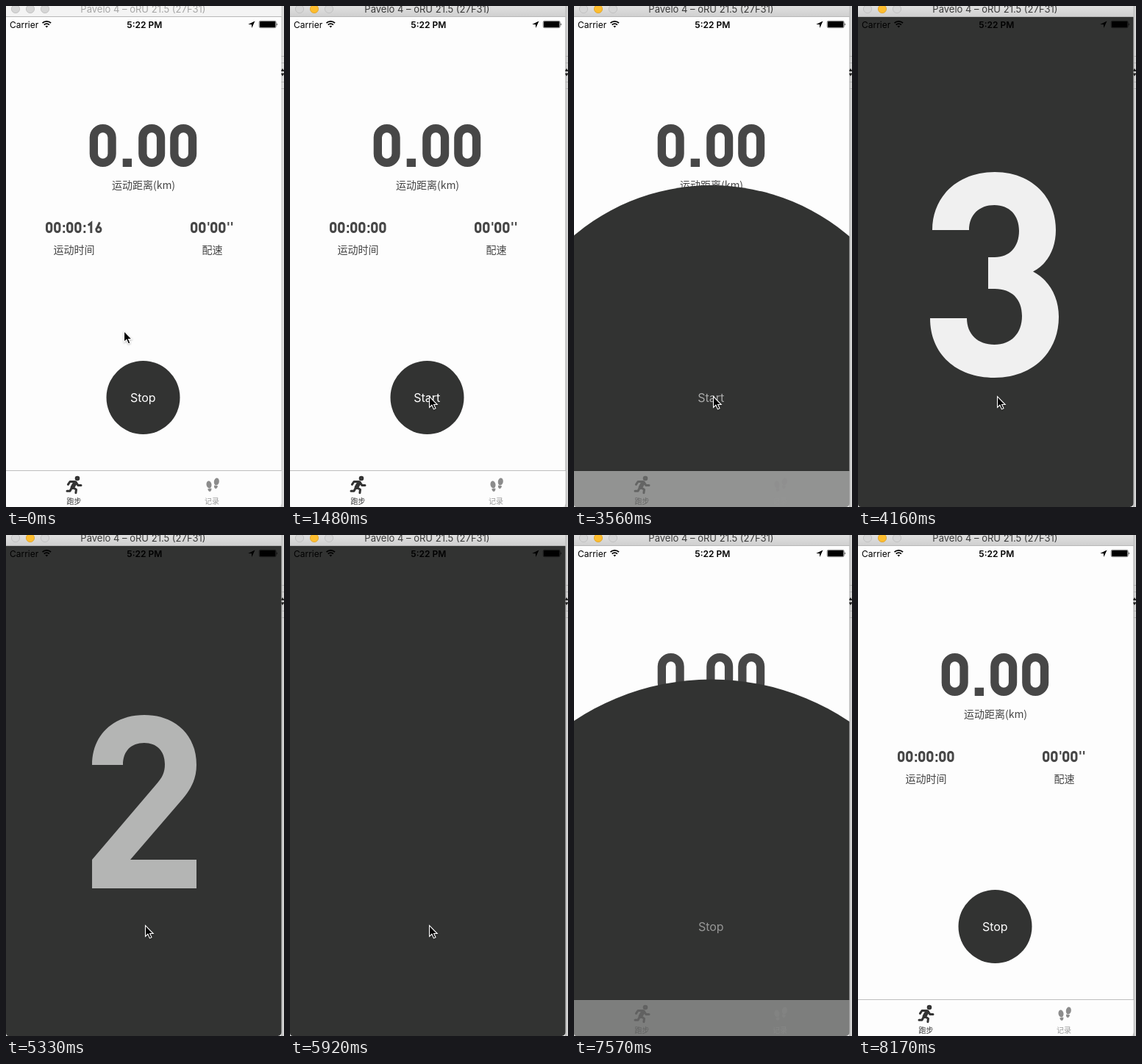
Write an HTML page that moves like this. It is 378 by 682 pixels and loops after 9190 ms.

```html
<!DOCTYPE html>
<html lang="zh">
<head>
<meta charset="utf-8">
<title>Run countdown</title>
<style>
  html, body { margin: 0; width: 100%; height: 100%; overflow: hidden; background: #e8e8e8; }
  svg { display: block; width: 100%; height: 100%; }
  text { font-family: Inter, "Noto Sans CJK SC", sans-serif; text-anchor: middle; }
  .label { font: 14px "Noto Sans CJK SC", sans-serif; fill: #444; }
  .tab { font: 10px "Noto Sans CJK SC", sans-serif; }
  .din { fill: none; stroke: #474747; stroke-width: 11.3; }
  .light { fill: #d6d6d6; stroke: #bcbcbc; stroke-width: .8; }
  #tabs > * { opacity: var(--fade); }
  #cursor { filter: drop-shadow(0 1px 1px #0004); }
</style>
</head>
<body>
<svg viewBox="0 0 378 682">
  <defs>
    <clipPath id="screen"><path d="M0 15H374.500V677a5 5 0 0 1-5 5H4a4 4 0 0 1-4-4z"/></clipPath>
    <linearGradient id="bar" x2="0" y2="1"><stop stop-color="#e0e0e0"/><stop offset="1" stop-color="#d0d0d0"/></linearGradient>
    <linearGradient id="shade"><stop stop-color="#b4b4b4"/><stop offset="1" stop-color="#dedede"/></linearGradient>
    <g id="foot">
      <ellipse cx="276" cy="651.500" rx="3.500" ry="5" transform="rotate(-8 276 651.500)"/>
      <path d="M274.300 657.300l5-.8c.8 5.500-4.400 6-5 .8z"/>
    </g>
  </defs>

  <!-- window behind -->
  <rect id="edge" x="374" width="4" height="682" fill="url(#shade)"/>
  <path d="M374 68.500h4M374 77.500h4M374 103.500h4M374 112.500h4" stroke="#b2b2b2"/>
  <path d="M373 89l3-4 3 4zM373 91.500l3 4 3-4z" fill="#222"/>

  <!-- app -->
  <g clip-path="url(#screen)">
    <rect y="15" width="374.500" height="667" fill="#fdfdfd"/>
    <g id="distance" class="din" transform="translate(113.700 161)"></g>
    <g id="time" class="din" transform="translate(54 294) scale(.2586)"></g>
    <g id="pace" class="din" transform="translate(251 294) scale(.2586)"></g>
    <text class="label" x="187" y="249">运动距离(km)</text>
    <text class="label" x="92.500" y="337">运动时间</text>
    <text class="label" x="280.500" y="337">配速</text>
    <circle id="disc" cx="186.500" cy="533" fill="#323332"/>
    <g id="tabs">
      <rect y="633" width="375" height="49" fill="#fdfdfd"/>
      <path d="M0 632.500H375" stroke="#000" stroke-opacity=".25"/>
      <g stroke="#333" fill="none" stroke-width="3" stroke-linecap="round" stroke-linejoin="round">
        <circle cx="97" cy="643" r="1.800"/>
        <path d="M94 649l-3.500 6" stroke-width="5.500"/>
        <path d="M95 648.500l3 4h4M93 647.500h-6l-2.600 3.800M91 655.500l4.500 2.700-.6 4.500M89 656.500l-2 3.800h-4"/>
      </g>
      <g fill="#8c8c8c">
        <use href="#foot"/>
        <use href="#foot" transform="matrix(-1 0 0 1 562.300 -4)"/>
      </g>
      <text class="tab" x="92.500" y="678" fill="#333">跑步</text>
      <text class="tab" x="280" y="678" fill="#999">记录</text>
    </g>
    <text id="action" x="186.300" y="539" font-size="16" fill="#fff"></text>
    <path id="count" fill="#fff"/>
  </g>

  <!-- status bar -->
  <text x="5" y="29.500" font-size="12" style="text-anchor:start">Carrier</text>
  <g fill="none" stroke="#000" stroke-width="1.700">
    <path d="M49.500 23.200a8.200 8.200 0 0 1 11.600 0M51.700 25.600a5.100 5.100 0 0 1 7.200 0"/>
    <path d="M55.300 29.500l-1.800-2a2.600 2.600 0 0 1 3.600 0z" fill="#000" stroke="none"/>
  </g>
  <text x="188.300" y="29.500" font-size="12" font-weight="600">5:22 PM</text>
  <path d="M338.500 20.500l-9.300 4.400 4.700.3.300 4.700z"/>
  <rect x="344.200" y="20.300" width="23" height="9.400" rx="2" fill="none" stroke="#000" stroke-width=".5"/>
  <rect x="345" y="21.100" width="21.400" height="7.800" rx="1.200"/>
  <path d="M368 23.300q1.800 1.700 0 3.400z"/>

  <!-- title bar -->
  <rect id="titlebar" width="374.500" height="14"/>
  <path d="M0 14.500H374.500" stroke="#b8b8b8"/>
  <circle class="light" cx="13" cy="4" r="5.600"/>
  <circle id="amber" class="light" cx="33" cy="4" r="5.600"/>
  <circle class="light" cx="53" cy="4" r="5.600"/>
  <text id="title" x="186.500" y="9" font-size="13">Pavelo 4 – oRU 21.5 (27F31)</text>

  <path id="cursor" d="M0 0v15l3.400-3.200 2.500 5.600 2.600-1.100-2.400-5.300h4.600z" stroke="#fff" stroke-width="1.100"/>
</svg>

<script>
const $ = id => document.getElementById(id);
const LOOP = 9190, STEP = 148.2;
const clamp = v => Math.min(1, Math.max(0, v));
const set = (id, attrs) => {
  for (const key in attrs) $(id).setAttribute(key, attrs[key]);
};

// stroked numerals, 58 units high: [advance, path]
const glyphs = {
  0: [43, 'M5.65 18a12.35 12.35 0 0 1 24.7 0v22a12.35 12.35 0 0 1-24.7 0z'],
  1: [43, 'M6 18L22 5V58'],
  6: [43, 'M24 1L9 33M18 27.6a12.35 12.35 0 1 1-.1 0z'],
  7: [43, 'M1 5.65H29L13 58'],
  '.': [23.5, 'M2 52.3h12.3'],
  ':': [22.5, 'M4.500 21h10.500M4.500 52.3h10.500'],
  "'": [18.5, 'M4 5.65h8M4 13h8']
};

function numerals(id, string) {
  if ($(id).dataset.value === string) return;
  $(id).dataset.value = string;
  set(id, { role: 'img', 'aria-label': string });
  let x = 0;
  $(id).innerHTML = [...string].map(char => {
    const [advance, d] = glyphs[char];
    const path = `<path d="${d}" transform="translate(${x})"/>`;
    x += advance;
    return path;
  }).join('');
}

// countdown numerals, each outlined at its own base scale
const countdown = [
  { start: 4091, length: 799, base: .9635, d: 'M101 305C101 258 137 226 186 226C235 226 269 259 269 305C269 330 258 351 238 361.5C260 373 273 396 273 423C273 473 236 506 185.5 506C134 506 98 474 98 425H148C148 447 163 461 185.5 461C208 461 223 446 223 422C223 399 209 385 186 385H177V342H186C206 342 219 328 219 306C219 285 206 271 185.5 271C165 271 151 284 151 305Z' },
  { start: 5042, length: 800, base: .817, d: 'M117 313C117 272 146 245 188 245C230 245 259 272 259 313C259 333 251 347 237 363L169 442H259V481H117V442L203 341C213 330 216 323 216 312C216 294 205 283 188 283C170 283 159 294 159 313Z' },
  { start: 6077, length: 755, base: .6075, d: 'M181 273H213V447H181V307L145.500 338V304Z' }
];

function drawCount(t) {
  const item = countdown.find(c => t >= c.start && t < c.start + c.length);
  if (!item) return set('count', { opacity: 0 });
  const alpha = 1 - (t - item.start) / item.length;
  const scale = (.5 + alpha / 2) / item.base;
  set('count', {
    d: item.d,
    opacity: alpha,
    transform: `translate(187 348.5) scale(${scale}) translate(-187 -348.5)`
  });
}

function drawCursor(t) {
  const p = clamp((t - 60) / 1120);
  const approach = p * p * (3 - 2 * p);
  const leave = Math.max(0, (t - 6700) / 414) ** 2;
  const x = 160.5 + 29 * approach + 109 * leave;
  const y = 442.5 + 89 * approach + 64 * leave;
  set('cursor', { transform: `translate(${x} ${y})` });
}

function draw(t) {
  const active = t >= 1330;
  set('titlebar', { fill: active ? 'url(#bar)' : '#f4f4f4' });
  set('title', { fill: active ? '#3a3a3a' : '#a6a6a6' });
  set('edge', { opacity: active ? 1 : .55 });
  $('amber').style.cssText = active ? 'fill:#fdbd2e;stroke:#dfa023' : '';

  const cover = clamp((t - 3080) / 1000) - clamp((t - 7130) / 1000);
  set('disc', { r: 50 + 501 * cover });
  $('tabs').style.setProperty('--fade', clamp(1 - 1.1 * cover));
  set('action', { opacity: clamp(1 - .9 * cover) * (cover < 1) });
  $('action').textContent = t > 1480 && t < 5000 ? 'Start' : 'Stop';

  numerals('time', t < 700 ? '00:00:16' : t < 1480 ? '00:00:17' : '00:00:00');
  drawCount(t);
  drawCursor(t);
}

numerals('distance', '0.00');
numerals('pace', "00'00''");

const begin = performance.now();
function tick() {
  const t = (performance.now() - begin) % LOOP;
  draw(Math.floor((t + 8) / STEP) * STEP);
  requestAnimationFrame(tick);
}
tick();
</script>
</body>
</html>
```
